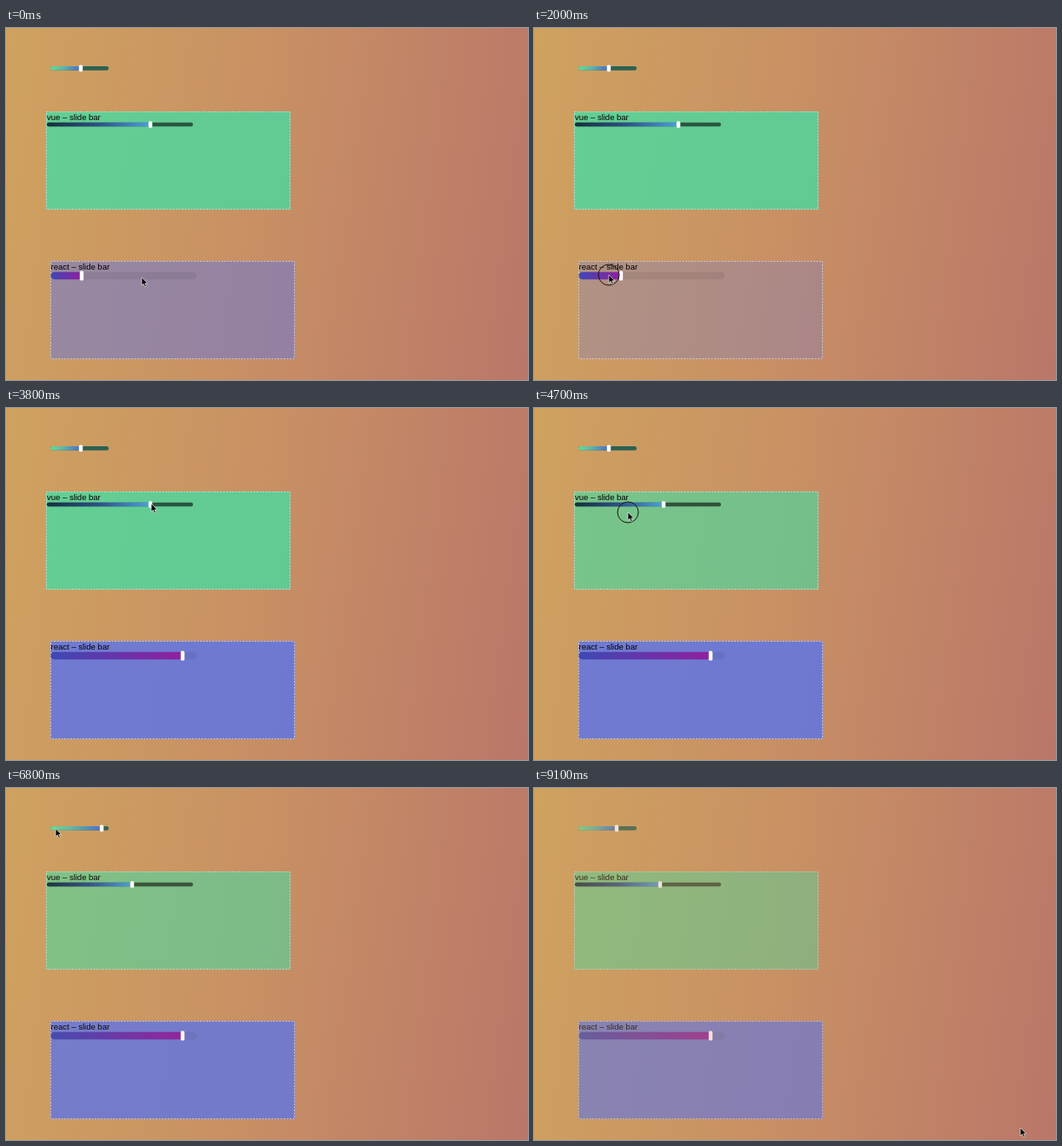
An HTML page for the animation above (9200 ms loop, 600 px wide and 405 px high).

```html
<!DOCTYPE html>
<html>
<head>
<meta charset="utf-8">
<style>
html, body { margin: 0; width: 100%; height: 100%; overflow: hidden; }
body { background: linear-gradient(98deg, #cfa25f, #c89064 48%, #ba7669); }
svg { display: block; width: 600px; height: 405px; }
text { font: 9.5px "Liberation Sans", Arial, sans-serif; }
.edge { fill: none; stroke: #ddd; stroke-opacity: .75; stroke-dasharray: 2 1.5; }
.thumb { fill: #fff; }
</style>
</head>
<body>
<svg viewBox="0 0 600 405">
  <defs>
    <linearGradient id="gTop"><stop stop-color="#6cd896"/><stop offset=".4" stop-color="#62b7a5"/><stop offset="1" stop-color="#486cca"/></linearGradient>
    <linearGradient id="gVue"><stop stop-color="#14303c"/><stop offset=".5" stop-color="#2d5088"/><stop offset="1" stop-color="#4ca0dc"/></linearGradient>
    <linearGradient id="gReact"><stop stop-color="#3f48b4"/><stop offset="1" stop-color="#901f9f"/></linearGradient>
  </defs>
  <g id="app">
    <g id="top"></g>
    <rect id="vueBox" x="46" y="96" width="281" height="113" fill="rgb(65,222,165)"/>
    <rect class="edge" x="46.5" y="96.5" width="280" height="112"/>
    <text x="47" y="105.6">vue – slide bar</text>
    <g id="vue"></g>
    <rect id="reactBox" x="51" y="268" width="281" height="113" fill="rgb(100,118,224)"/>
    <rect class="edge" x="51.5" y="268.5" width="280" height="112"/>
    <text x="51.5" y="277.8">react – slide bar</text>
    <g id="react"></g>
  </g>
  <g id="mouse">
    <circle id="ring" r="12" fill="none" stroke="#1c1512"/>
    <path d="M0 0V9.2L2.2 7.3L3.8 10.9L5.3 10.2L3.8 6.8H6.7Z" fill="#000" stroke="#fff" stroke-width=".6"/>
  </g>
</svg>
<script>
const $ = id => document.getElementById(id);
const ramp = (t, a, b) => Math.min(1, Math.max(0, (t - a) / (b - a)));
const mix = (a, b, k) => a + (b - a) * k;

// Eased value of column c in rows of [time, ...values]
function track(rows, t, c = 1) {
  let i = 0;
  while (i < rows.length - 2 && t >= rows[i + 1][0]) i++;
  const a = rows[i], b = rows[i + 1], k = ramp(t, a[0], b[0]);
  return mix(a[c], b[c], k * k * (3 - 2 * k));
}

// Builds a slider; the returned function moves it and gives its value
function slider(id, x, y, w, h, trackFill, thumbH) {
  const bar = `x="${x}" y="${y - h / 2}" height="${h}" rx="${h / 2}"`;
  $(id).innerHTML = `<rect ${bar} width="${w}" fill="${trackFill}"/>
    <rect ${bar} fill="url(#g${id[0].toUpperCase() + id.slice(1)})"/>
    <rect class="thumb" y="${y - thumbH / 2}" width="4.4" height="${thumbH}" rx="1.6"/>`;
  const [, fill, thumb] = $(id).children;
  return pos => {
    fill.setAttribute("width", pos - x);
    thumb.setAttribute("x", pos - 2.2);
    return (pos - x) / w;
  };
}

const setTop = slider("top", 51, 46.4, 67, 4.6, "#2b6152", 7.6);
const setVue = slider("vue", 47, 111, 168, 4.4, "rgba(0,0,0,.58)", 7.6);
const setReact = slider("react", 51.5, 285, 168, 8.6, "rgba(0,0,0,.07)", 11);

const topPath = [[5800, 86], [6300, 110], [6800, 110], [7100, 58], [8300, 58], [8600, 95]];
const vuePath = [[4400, 166], [4700, 149], [5000, 50], [5400, 145]];
const reactPath = [[1100, 87], [1600, 185], [2000, 100], [2300, 70], [3000, 203]];
const mousePath = [
  [0, 156, 287], [900, 87, 285], [1000, 87, 285], [1500, 185, 285], [2000, 86, 284],
  [2200, 70, 284], [2800, 203, 285], [3100, 203, 285], [3700, 167, 110], [4300, 167, 112],
  [4700, 108, 120], [4900, 41, 120], [5250, 145, 114], [5350, 145, 114], [5700, 86, 45],
  [6200, 110, 45], [6500, 57, 45], [6900, 57, 47], [7500, 430, 200], [8100, 94, 46],
  [8500, 94, 46], [9000, 520, 350], [9100, 559, 391]
];
const presses = [[1000, 3100], [3900, 5300], [5700, 6700], [8100, 8300]];

function draw(t) {
  const top = setTop(track(topPath, t));
  const vue = setVue(track(vuePath, t));
  const react = setReact(track(reactPath, t));
  // Each opacity holds its initial value until its slider is first used
  $("app").style.opacity = mix(1, Math.min(1, top + .07), ramp(t, 5800, 6000));
  $("vueBox").style.opacity = mix(.75, vue, ramp(t, 4100, 4500));
  $("reactBox").style.opacity = mix(.5, react - .02, ramp(t, 1100, 1300));
  $("mouse").setAttribute("transform", `translate(${track(mousePath, t)} ${track(mousePath, t, 2)})`);
  $("ring").style.display = presses.some(([a, b]) => t >= a && t < b) ? "" : "none";
}

const start = performance.now();
function tick() {
  draw(Math.floor((performance.now() - start) % 9200 / 100) * 100);
  requestAnimationFrame(tick);
}
tick();
</script>
</body>
</html>
```
